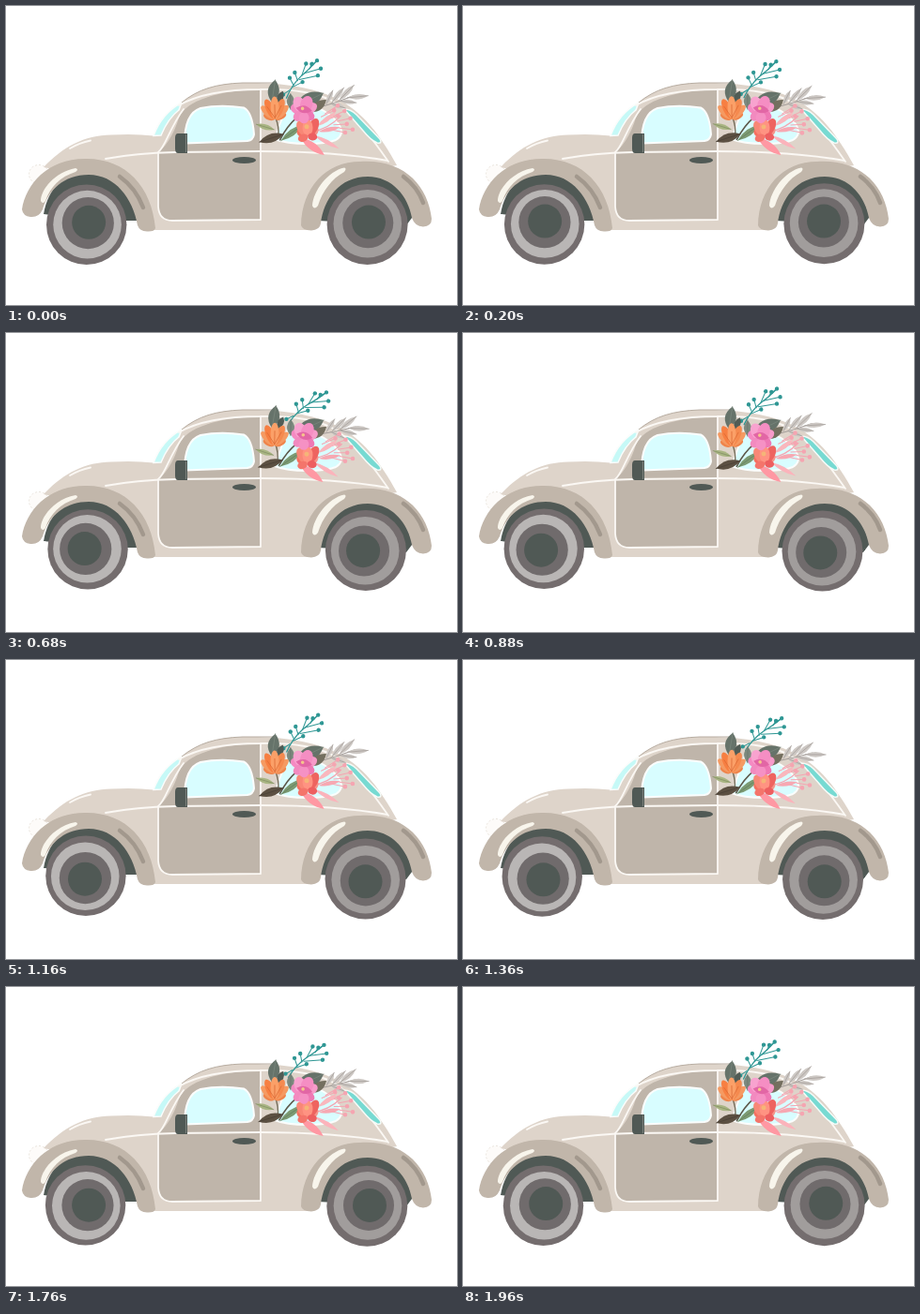
An HTML page for the animation above (2 s loop, 480 by 319 pixels).

```html
<!DOCTYPE html>
<html lang="en">
<head>
<meta charset="utf-8">
<title>Flower car</title>
<style>
html, body { margin: 0; width: 100%; height: 100%; overflow: hidden; background: #fff; }
svg { display: block; width: 480px; height: 319px; }
.line { fill: none; stroke: #fbf8f4; stroke-width: 1.8; stroke-linecap: round; stroke-linejoin: round; }
.shine { fill: #f8f5ec; }
.shade { fill: none; stroke: #a2988d; stroke-width: 4.5; stroke-linecap: round; }
.body { fill: #ded4ca; }
.fender { fill: #c1b6aa; }
.dark { fill: #505955; }
.glass { fill: #d8fdff; stroke: #fbfdfc; stroke-width: 2; stroke-linejoin: round; }
</style>
</head>
<body>
<svg viewBox="0 0 480 319" xmlns="http://www.w3.org/2000/svg">
  <path class="dark" d="M40 222C45 193 62 178 88 178C117 178 136 202 141 229H100Z"/>
  <path class="dark" d="M332 229C336 200 356 180 386 180C414 180 431 200 435 222L426 234Z"/>

  <ellipse cx="35" cy="179.500" rx="10.500" ry="10" fill="#fdfbf9" stroke="#e4ddd5" stroke-width=".8" stroke-dasharray="2 2"/>
  <path class="body" d="M40 172C61 150 83 138 112 137.500Q137 136 157 138.500C163 122 174 110 187 103C204 89 223 83 252 82C288 81 326 86 350 98C380 112 399 139 416 170L400 173C365 165 335 178 324 239H148C144 195 113 160 60 176Z"/>
  <path class="line" d="M68 152Q78 146 90 143.500"/>

  <path d="M157 138.500C163 122 174 110 187 103L184 111C176 117 170 126 165 138Z" fill="#c6f9f7" stroke="#fbfdfc" stroke-width="1.500"/>
  <path d="M187 103C204 89 223 83 252 82H288" fill="none" stroke="#b8ada2" stroke-width="1"/>

  <path d="M162 156C170 151 180 134 184 119C192 101 225 90 271 89V228L177 229Q163 229 162 214Z" fill="#bfb5aa"/>
  <path class="line" d="M184 106C203 95 233 89 271 89C305 88 335 93 352 104C374 120 391 143 407 166"/>
  <path class="line" d="M271 89V228L177 229Q163 229 162 214V156C170 150 174 130 189 110"/>
  <path class="line" d="M106 163Q138 157 180 156L271 155Q350 155 406 165"/>
  <path class="glass" d="M190 146.500C190 125 195 113 207 109Q228 105 253 108.500C260 112 263 124 264 137Q263 143 257 144Z"/>
  <path class="glass" d="M286 142C303 149 339 148 351 143Q361 137 354 126C343 111 323 102 300 102Z"/>
  <path d="M360 110Q367 110 373 116L398 142Q401 147 395 146Q388 143 380 133Z" fill="#77dad2" stroke="#f5fbf8" stroke-width="1.500"/>

  <path class="dark" d="M183 136H193V157H183Q180 157 180 152V141Q180 136 183 136Z"/>
  <path d="M191.500 137V156" stroke="#7a807b"/>
  <ellipse class="dark" cx="253.500" cy="164.500" rx="12.500" ry="3.500"/>

  <g id="wheels"></g>

  <path class="fender" d="M17 217C21 190 45 162 86 163C128 163 155 193 159 237Q158 241 150 240.500Q142 240 140 234C135 205 116 180 88 180C61 180 45 197 39 217Q35 226 26 225Q18 224 17 217Z"/>
  <path class="shine" d="M37 208C37 196 52 177 74 173Q78 174 74 177C58 182 47 193 42 208Q39 212 37 208Z"/>
  <path class="shade" d="M121 182Q138 194 146 215"/>

  <path class="fender" d="M314 234C315 194 340 166 377 166C424 163 449 192 453 227Q453 235 444 235.500Q435 235 432 226C428 203 411 182 385 182C355 182 338 206 335 232Q334 239 325 239.500Q315 239 314 234Z"/>
  <path class="shine" d="M326 213C327 197 343 176 360 172.500Q363 173 360 177C347 184 337 197 332 213Q328 218 326 213Z"/>
  <path class="shade" d="M423 182Q438 193 444 210"/>

  <g id="flowers"></g>
</svg>
<script>
const STEP = 40, LOOP = 2000, SWAY = 1000;
const byId = id => document.getElementById(id);
const circle = (x, y, r, fill) => `<circle cx="${x}" cy="${y}" r="${r}" fill="${fill}"/>`;
const stroke = (d, color, w) =>
  `<path d="${d}" fill="none" stroke="${color}" stroke-width="${w}" stroke-linecap="round"/>`;

// Pointed leaf from (x, y) to (u, v); w is its half width.
function leaf(x, y, u, v, w, fill, vein) {
  const len = Math.hypot(u - x, v - y);
  const nx = (y - v) / len * w * 2, ny = (u - x) / len * w * 2;
  const mx = (x + u) / 2, my = (y + v) / 2;
  const d = `M${x} ${y}Q${mx + nx} ${my + ny} ${u} ${v}Q${mx - nx} ${my - ny} ${x} ${y}Z`;
  return `<path d="${d}" fill="${fill}"/>` + (vein ? stroke(`M${x} ${y}L${u} ${v}`, vein, .7) : '');
}

// Each petal: angle in degrees clockwise from up, length, half width, colour.
function petals(x, y, list) {
  return list.map(([a, len, w, fill]) =>
    `<ellipse cx="${x}" cy="${y - len / 2}" rx="${w}" ry="${len / 2}" fill="${fill}" transform="rotate(${a} ${x} ${y})"/>`).join('');
}

const group = (name, parts) => `<g id="${name}">${parts.join('')}</g>`;

function tealSprig() {
  const c = '#2f9794';
  const twigs = [[304, 89, 297, 93], [309, 84, 306, 76], [314, 80, 312, 71], [319, 75, 325, 63],
    [330, 66, 337, 61], [322, 73, 340, 70], [316, 79, 336, 77], [328, 69, 331, 64], [308, 86, 319, 82]];
  return [stroke('M300 97Q307 84 319 75Q327 70 337 61', c, 1.3)].concat(
    twigs.map(([x, y, u, v]) => stroke(`M${x} ${y}L${u} ${v}`, c, 1) + circle(u, v, 2.2, c)));
}

function graySprig() {
  const c = '#cdc8c4', v = '#a09a96';
  return [stroke('M334 108Q353 104 372 98', '#a59e9a', 1.1),
    leaf(364, 100, 386, 99.5, 2.8, c, v), leaf(355, 102, 372, 87, 3, c, v),
    leaf(347, 104, 361, 89, 2.8, c, v), leaf(341, 105, 349, 91, 2.6, c, v),
    leaf(356, 103, 373, 106, 2.5, c, v), leaf(346, 105, 361, 111, 2.5, c, v)];
}

function pinkSprig() {
  const c = '#f5a5b1';
  const tips = [[354, 107], [361, 113], [367, 121], [369, 133], [361, 136], [350, 112], [363, 127], [354, 118]];
  return [stroke('M325 134Q343 132 357 118', c, 1.3)].concat(
    tips.map(([x, y]) => stroke(`M${x - 14} ${y + (128 - y) * .4}L${x} ${y}`, c, 1) + circle(x, y, 2.3, c)),
    [leaf(332, 128, 352, 114, 2.6, '#f9b7bd'), leaf(333, 134, 356, 130, 2.3, '#f7a8b2'),
      leaf(328, 138, 354, 153, 2.4, '#fbb3bb')]);
}

const green = '#66736a', pale = '#7c897e', deep = '#515c55';
byId('flowers').innerHTML = [
  group('gray', graySprig()),
  group('pinkSprig', pinkSprig()),
  group('teal', tealSprig()),
  group('leaves', [
    leaf(283, 102, 287, 78, 6, green, pale), leaf(289, 103, 295, 90, 3.5, deep),
    leaf(303, 110, 303, 93, 4, pale, green), leaf(308, 107, 338, 93, 7.5, green, pale),
    leaf(324, 113, 341, 100, 4.5, '#746f5f'),
    stroke('M291 142Q299 127 310 118', '#5d594b', 1.6),
    stroke('M286 117Q291 128 289 139', '#746c59', 1.4),
    leaf(292, 143, 316, 126, 3.5, '#7c9a72', '#5f7d5d'),
    leaf(285, 131, 266, 125, 2.8, '#a9b583', '#7f8c62'),
    leaf(269, 144, 295, 136, 4.5, '#5c5042', '#483f35'),
    leaf(313, 140, 338, 159, 4, '#ff98a3')]),
  group('coral', [petals(321, 139, [
    [-58, 13, 5, '#f5705f'], [50, 14, 5, '#f5948a'], [-32, 19, 5.5, '#f88776'],
    [30, 21, 5.5, '#ee6460'], [0, 18, 5.5, '#ff9382'], [100, 10, 4, '#ed5f60'], [-110, 11, 4, '#f4756b']]),
    circle(320, 129, 2.5, '#f5b578')]),
  group('orange', [petals(286, 120, [
    [-68, 13, 3.5, '#ef844b'], [66, 13, 3.5, '#ef844b'],
    [-46, 20, 4, '#f59a62'], [46, 20, 4, '#f59a62'], [-24, 23, 4.5, '#f77f42'],
    [24, 23, 4.5, '#f58a4f'], [0, 24, 4.5, '#fba068']]),
    stroke('M286 119L278 107M286 119L293 106M286 118V105', '#dc6a35', .8)]),
  group('pink', [petals(317, 113, [
    [-62, 15, 5.5, '#f58ac2'], [62, 16, 5.5, '#f79bca'], [-25, 18, 6.5, '#f8a3cf'],
    [22, 18, 6.5, '#f58ec3'], [125, 13, 5, '#ee78b4'], [-125, 13, 5, '#f28abf'], [180, 12, 5.5, '#f591c4']]),
    leaf(309, 108, 326, 112, 4, '#e266a5'), circle(316, 109, 1.8, '#f5c48c')])
].join('');

// Each ring circles its wheel's centre with its own offset and phase.
const wheels = [
  { x: 85.7, y: 231.7, rings: [[42.7, '#746d6e', 1.6, -90], [36.3, '#b9b6b5', 1.7, -60], [27.6, '#706b6c', 1.6, 5], [18, '#505955', 2.6, 20]] },
  { x: 383.5, y: 233, rings: [[43, '#746d6e', 1.1, 0], [36.3, '#a19d9c', 1.5, 30], [27, '#706b6c', 2.5, 45], [18, '#505955', 3.5, 45]] }
];
byId('wheels').innerHTML = wheels.map(w => w.rings.map(([r, c]) => circle(w.x, w.y, r, c)).join('')).join('');
const discs = [...byId('wheels').children];

// Sway of each part: id, half angle, pivot, half shift.
const sways = [
  ['teal', 7, 298, 98, 1.5, -1.5], ['gray', 4.5, 335, 106, 0, 0], ['pinkSprig', 2, 330, 135, 0, 0],
  ['leaves', 1, 292, 140, -.6, -.8], ['coral', 1.5, 320, 140, -.3, .2],
  ['orange', 1.5, 286, 122, -.4, -.5], ['pink', 3, 317, 111, .3, -.3]
].map(([id, ...move]) => [byId(id), ...move]);

function draw(t) {
  let i = 0;
  const turn = 2 * Math.PI * t / LOOP;
  for (const w of wheels) for (const [, , off, phase] of w.rings) {
    const a = turn + phase * Math.PI / 180;
    discs[i].setAttribute('cx', (w.x + off * Math.cos(a)).toFixed(2));
    discs[i++].setAttribute('cy', (w.y - off * Math.sin(a)).toFixed(2));
  }
  const s = -Math.cos(2 * Math.PI * (t - 50) / SWAY);
  for (const [el, angle, x, y, dx, dy] of sways)
    el.setAttribute('transform', `translate(${dx * s} ${dy * s}) rotate(${angle * s} ${x} ${y})`);
}

const start = performance.now();
function tick() {
  const t = Math.max(0, performance.now() - start) % LOOP;
  draw(Math.floor(t / STEP) * STEP);
  requestAnimationFrame(tick);
}
tick();
</script>
</body>
</html>
```
